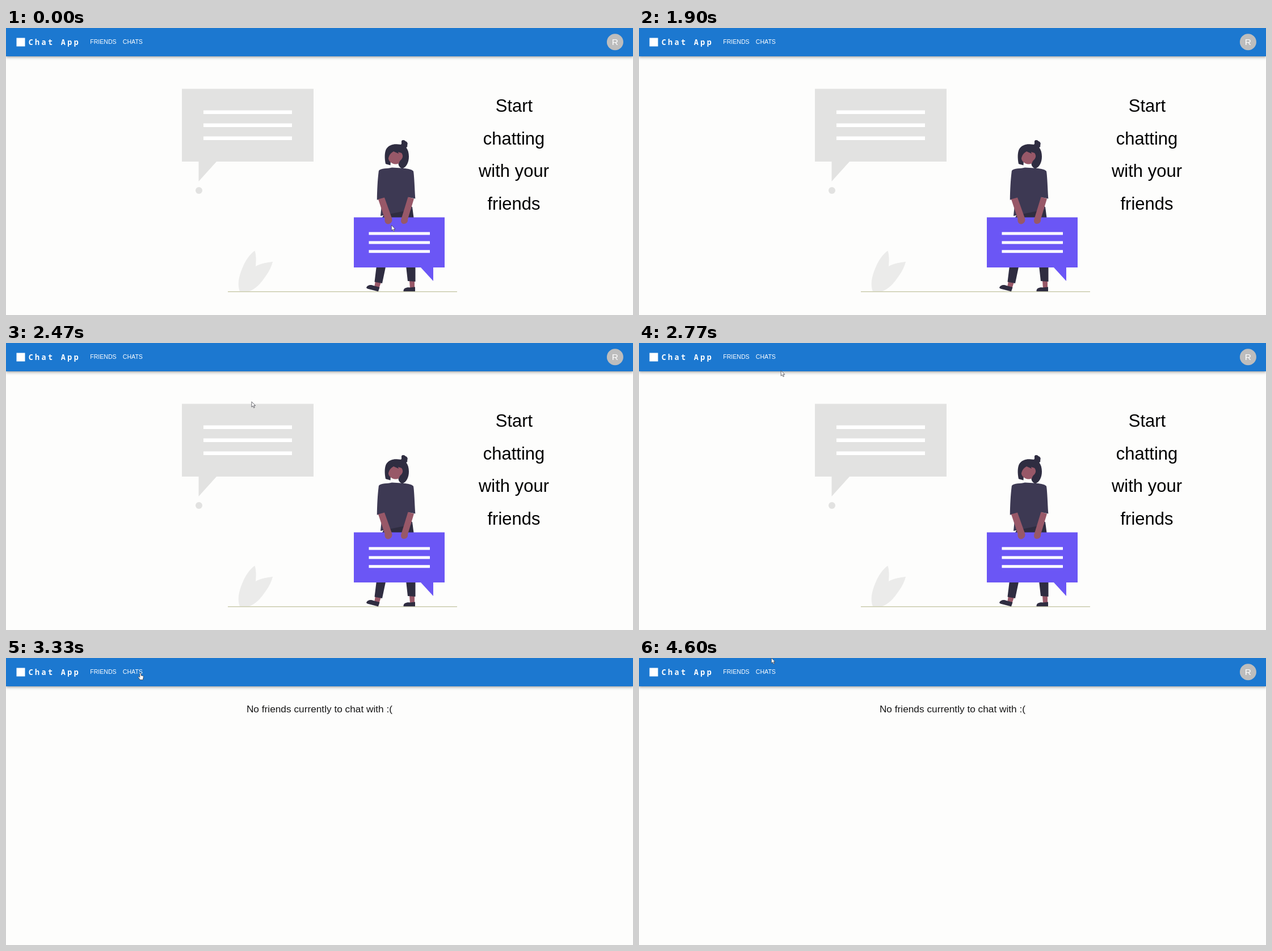
Write an HTML page that moves like this. It is 1105x507 px and loops after 4790 ms.

```html
<!DOCTYPE html>
<html lang="en">
<head>
<meta charset="utf-8">
<title>Chat App</title>
<style>
  html, body { margin: 0; width: 100%; height: 100%; overflow: hidden; background: #fdfdfc; }
  header {
    position: absolute; left: 0; top: 0; width: 100%; height: 49.5px; background: #1c78d0;
    box-shadow: 0 1.5px 3px -1px rgba(0,0,0,.2), 0 3px 4px rgba(0,0,0,.14), 0 1px 8px rgba(0,0,0,.12);
  }
  svg { position: absolute; left: 0; top: 0; }
  text { font-family: "Liberation Sans", Arial, sans-serif; }
  .brand { font: bold 13.4px "Noto Sans Mono", monospace; letter-spacing: 3.4px; }
  .nav { font-size: 10.6px; }
  .slogan { font: 31px Lato, sans-serif; text-anchor: middle; }
  .notice { font-size: 17.27px; text-anchor: middle; }
  .hair { fill: #2f2d41; }
  .skin { fill: #985868; }
  .shirt { fill: #3d3953; }
  .cursor { fill: #fff; stroke: #3a3a42; stroke-width: .75; stroke-linejoin: round; }
</style>
</head>
<body>
<header></header>
<svg width="1105" height="507" viewBox="0 0 1105 507">
  <g fill="#fff">
    <rect x="18.5" y="17.5" width="15" height="15"/>
    <text class="brand" x="39.7" y="29.5">Chat App</text>
    <text class="nav" x="148.2" y="28.3">FRIENDS</text>
    <text class="nav" x="205.8" y="28.3">CHATS</text>
    <g id="avatar">
      <circle cx="1073.4" cy="24.7" r="14.5" fill="#bdbdbd"/>
      <text x="1073.4" y="30.2" font-size="15.5" text-anchor="middle">R</text>
    </g>
  </g>

  <g id="home">
    <!-- grey bubble -->
    <path fill="#e2e2e1" d="M310 107.5H542V236H371L339.5 271V236H310Z"/>
    <circle cx="340" cy="287" r="6" fill="#e2e2e1"/>
    <path stroke="#fff" stroke-width="6.6" d="M348 148.8H504M348 171.8H504M348 194.8H504"/>
    <!-- plant and ground -->
    <path fill="#ebebea" d="M412 465.5C407 452 411 437 417 423C422 411 430 399 438.5 393.5C441 401 441 411 440 421C449 416 460 414 470 413C467 425 461 434 455 442C448 452 440 461 428 465.5Z"/>
    <path stroke="#cbccae" stroke-width="1.4" d="M391 465.8H795"/>

    <!-- legs -->
    <path class="skin" d="M651 447L661 449L657 461L649 458ZM711 446H720V460H712Z"/>
    <path class="hair" d="M653 420H669.5L663 451L649.5 448.5ZM705 420H721.5V448L708 447Z"/>
    <path class="hair" d="M635 459C637 453 644 453 649 455.5L658.5 458L656 465.5L637 460.5ZM700.5 465.3C700 459 707 457.5 712 458.5L721 457.5V465.3Z"/>
    <!-- torso -->
    <path class="hair" d="M663 335L668 326L716 316L718.5 335Z"/>
    <path class="shirt" d="M657 252C661 247 672 249 680 246.5L697 247.5C705 248 715 249 718 253C719.5 262 720 280 721.3 301.5L709 299L714 305L715.5 320.5L660 332L663 302.5L653.8 303.5C654 286 655 266 657 252Z"/>
    <!-- head -->
    <path class="hair" d="M697 200C698 197 703 198 704 200C708 201 708.5 205 707 207C709 210 704 213 699 212C694 212 694 206 697 205Z"/>
    <path class="hair" d="M669 240C667 230 667 220 670 214C675 206 684 204.500 691 205.500C704 205 710 214 710 227C710 237 706 246 698 248.500C691 245 691 240 692 235L678 233L677.500 242.500Z"/>
    <ellipse class="skin" cx="686.500" cy="228" rx="13" ry="12.500"/>
    <path class="hair" d="M669 236C668 219 677 209 689 209C701 209 707 219 706 232C704 240 700 246 696 245C691 241 692 236 697 232C700 228 700 223 698 221L691 219L692 222L683 218C678 221 674 225 673.500 234L676 241L670 240Z"/>

    <!-- held bubble -->
    <path fill="#6b56f5" d="M613 334.5H773V423H753V447L731 423H613Z"/>
    <path stroke="#fff" stroke-width="5" d="M639.5 363H747M639.5 379H747M639.5 394.8H747"/>
    <!-- arms -->
    <path class="skin" d="M656 302.5L667 299.5L680 336C682 342 678 346 673 346.500C668 346 667 341 667.500 337ZM708.500 298.500L719 301.500L708 338C709 343 705 346 701 346C696 345.500 695 341 697 336Z"/>

    <g class="slogan">
      <text x="895.5" y="148">Start</text>
      <text x="895" y="205.5">chatting</text>
      <text x="895" y="263">with your</text>
      <text x="895" y="320.5">friends</text>
    </g>
  </g>

  <text id="empty" class="notice" x="552.5" y="95.800" fill="#161616">No friends currently to chat with :(</text>

  <g id="cursor" class="cursor">
    <path id="arrow" d="M.3 .3V9.700L2.500 7.700L4.100 11.200L5.600 10.500L4.100 7.200H7Z"/>
    <path id="hand" d="M-1.200 1C-1.200-.4 1-.4 1 1V4.500L4 5C5 5.200 5.300 6 5.200 7L4.500 10.500V12H-1.300V11L-3.800 7.800C-4.400 6.500-3 6-2.200 6.800L-1.200 7.800Z"/>
  </g>
</svg>
<script>
const LOOP = 4790;
const HIDE = 1030, MOVE = 2130, OPEN = 3330, LOADED = 3430;

// time, x, y, ease-out power of the stretch that ends here
const path = [
  [0, 679, 348, 1],
  [MOVE, 679, 348, 1],
  [2300, 594, 152, 1],
  [2770, 250, 48.5, 1.4],
  [3270, 237, 26.5, 1.5],
  [4390, 237, 26.5, 1],
  [4600, 233, -.5, 1],
  [LOOP, 233, -.5, 1]
];

const el = id => document.getElementById(id);
const [home, empty, avatar, cursor, arrow, hand] =
  ["home", "empty", "avatar", "cursor", "arrow", "hand"].map(el);
const show = (node, on) => node.setAttribute("visibility", on ? "visible" : "hidden");

function position(t) {
  const i = path.findIndex(p => p[0] > t);
  const [t0, x0, y0] = path[i - 1], [t1, x1, y1, power] = path[i];
  const k = 1 - (1 - (t - t0) / (t1 - t0)) ** power;
  return [x0 + (x1 - x0) * k, y0 + (y1 - y0) * k];
}

function draw(now) {
  const t = now % LOOP;
  const [x, y] = position(t);
  const overLink = x < 248 && y > 11 && y < 38;
  const visible = t < HIDE || t >= MOVE;

  show(home, t < OPEN);
  show(empty, t >= OPEN);
  show(avatar, t < OPEN || t >= LOADED);
  show(arrow, visible && !overLink);
  show(hand, visible && overLink);
  cursor.setAttribute("transform", `translate(${x} ${y})`);
  requestAnimationFrame(draw);
}
draw(0);
</script>
</body>
</html>
```
